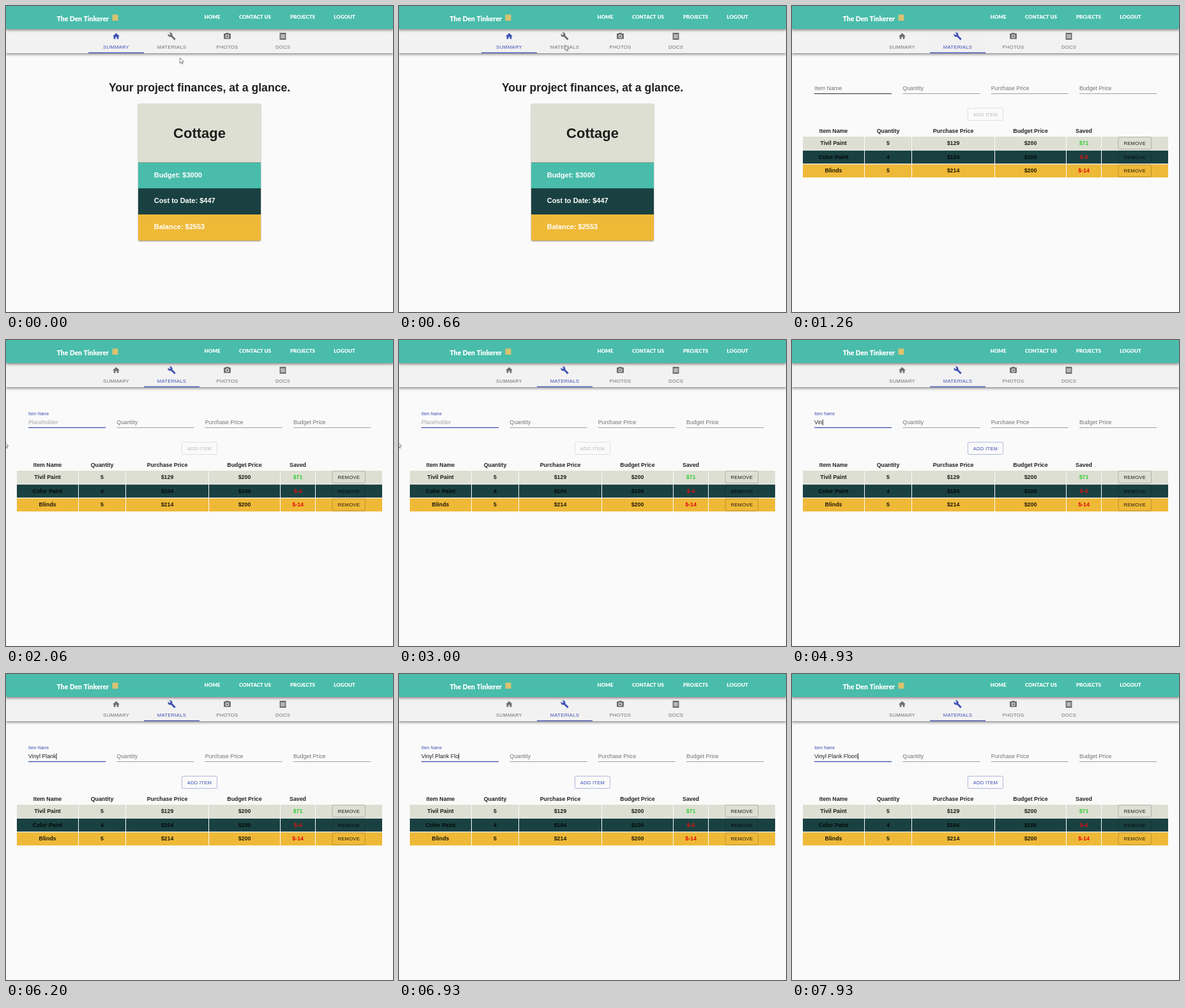
These frames come from a looping animation (606 px wide and 480 px high, 8000 ms). An HTML page with a canvas:

```html
<!DOCTYPE html>
<html lang="en">
<head>
<meta charset="utf-8">
<title>Project materials</title>
<style>
html, body { margin: 0; width: 100%; height: 100%; overflow: hidden; background: #fafafa; }
canvas { display: block; width: 100vw; height: 100vh; }
</style>
</head>
<body>
<canvas id="stage" width="606" height="480"></canvas>
<script>
const ctx = document.getElementById('stage').getContext('2d');
const LOOP = 8000;
const SANS = '"Liberation Sans", Arial, sans-serif';
const BRAND = 'Lato, sans-serif';
const INDIGO = '#3f51b5', INK = 'rgba(0,0,0,.87)', GREY = 'rgba(0,0,0,.54)';
const TEAL = '#49bcab', DARK = '#1a4141', GOLD = '#efb938', STONE = '#dcdfd2';

// Moments of the interaction, in ms
const PRESS = 650, SWITCH = 720, HOVER = 1150, FOCUS = 1400, LEAVE = 1540, FIRST_KEY = 3530;
const BLINK = 530;
const PHRASE = 'Vinyl Plank Floori';
const KEYS = [FIRST_KEY, 4600, 4800, 5060, 5200, 5340, 5480, 5630, 5780, 5930,
  6100, 6330, 6490, 6650, 6810, 6960, 7130, 7800];

const TABS = ['SUMMARY', 'MATERIALS', 'PHOTOS', 'DOCS'];
const ICONS = [
  'M10 20v-6h4v6h5v-8h3L12 3 2 12h3v8z',
  'M22.7 19l-9.1-9.1c.9-2.3.4-5-1.5-6.9-2-2-5-2.4-7.4-1.3L9 6 6 9 1.6 4.7C.4 7.1.9 10.1 2.9 12.1c1.9 1.9 4.6 2.4 6.9 1.5l9.1 9.1c.4.4 1 .4 1.4 0l2.3-2.3c.5-.4.5-1.1.1-1.4z',
  'M15.2 12a3.2 3.2 0 1 1-6.4 0 3.2 3.2 0 0 1 6.4 0zM9 2L7.2 4H4c-1.1 0-2 .9-2 2v12c0 1.1.9 2 2 2h16c1.1 0 2-.9 2-2V6c0-1.1-.9-2-2-2h-3.2L15 2H9zm3 15a5 5 0 1 1 0-10 5 5 0 0 1 0 10z',
  'M3 2h18v20H3zM6 7v2h12V7zM6 11v2h12v-2zM6 15v2h12v-2z'
].map(d => new Path2D(d));
const ARROW = new Path2D('M0 0V15L3.6 11.8 6 17.2 8.4 16.1 6 10.9H10.8z');
// Each move: start, end, then from and to positions
const MOVES = [
  [60, 520, 272.3, 81.3, 260, 61],
  [780, HOVER, 260, 61, 90, 130],
  [LEAVE - 80, 1730, 90, 130, -2.2, 160]
];

const FIELDS = ['Item Name', 'Quantity', 'Purchase Price', 'Budget Price'];
const HEADS = ['Item Name', 'Quantity', 'Purchase Price', 'Budget Price', 'Saved'];
const COLS = [17, 114, 188, 318, 430, 485, 590];
const ROWS = [
  { fill: STONE, saved: '#32cd32', cells: ['Tivil Paint', '5', '$129', '$200', '$71'] },
  { fill: DARK, saved: '#d81414', cells: ['Color Paint', '4', '$104', '$100', '$-4'] },
  { fill: GOLD, saved: '#e00808', cells: ['Blinds', '5', '$214', '$200', '$-14'] }
];

const clamp = x => Math.min(1, Math.max(0, x));
const ease = x => { x = clamp(x); return x * x * (3 - 2 * x); };
const lerp = (a, b, k) => a + (b - a) * k;
const mix = (a, b, k) => `rgba(${a.map((v, i) => lerp(v, b[i], k)).join()})`;

function text(s, x, y, size, color, { weight = 400, align = 'left', face = SANS, gap = 0 } = {}) {
  ctx.font = `${weight} ${size}px ${face}`;
  ctx.letterSpacing = gap + 'px';
  ctx.textAlign = align;
  ctx.fillStyle = color;
  ctx.fillText(s, x, y);
}

function rect(x, y, w, h, color) {
  ctx.fillStyle = color;
  ctx.fillRect(x, y, w, h);
}

function shaded(blur, dy, alpha, draw) {
  ctx.save();
  ctx.shadowColor = `rgba(0,0,0,${alpha})`;
  ctx.shadowBlur = blur;
  ctx.shadowOffsetY = dy;
  draw();
  ctx.restore();
}

function button(label, x, y, w, h, color, border) {
  ctx.strokeStyle = border;
  ctx.lineWidth = .8;
  ctx.beginPath();
  ctx.roundRect(x, y, w, h, 2);
  ctx.stroke();
  text(label, x + w / 2, y + h / 2 + 2.8, 7.7, color, { align: 'center', gap: .22 });
}

function drawRipple(t) {
  const grow = ease((t - PRESS) / 400), fade = 1 - clamp((t - SWITCH) / 550);
  if (!grow || !fade) return;
  ctx.save();
  ctx.beginPath();
  ctx.rect(216, 37, 87, 37);
  ctx.clip();
  ctx.fillStyle = `rgba(63,81,181,${.2 * fade})`;
  ctx.beginPath();
  ctx.arc(260, 62, 52 * grow, 0, 7);
  ctx.fill();
  ctx.restore();
}

function drawTabs(t) {
  shaded(4, 1.5, .45, () => rect(0, 36, 606, 38, '#f2f2f2'));
  drawRipple(t);
  const active = t < SWITCH ? 0 : 1;
  TABS.forEach((label, i) => {
    const x = 172.5 + 87 * i, color = i === active ? INDIGO : GREY;
    ctx.save();
    ctx.translate(x - 6.6, 40.8);
    ctx.scale(.55, .55);
    ctx.fillStyle = color;
    ctx.fill(ICONS[i], 'evenodd');
    ctx.restore();
    text(label, x, 66.5, 7.7, color, { align: 'center', gap: .25 });
  });
  rect(129 + 87 * ease((t - SWITCH) / 300), 72.7, 87, 1.3, INDIGO);
}

function drawHeader() {
  shaded(4, 1.5, .45, () => rect(0, 0, 606, 36, TEAL));
  text('The Den Tinkerer', 79.5, 23.6, 10.4, '#fff', { weight: 900, face: BRAND });
  rect(166.5, 13.5, 9, 9.5, '#d9c270');
  [['HOME', 323], ['CONTACT US', 390], ['PROJECTS', 464.5], ['LOGOUT', 530]].forEach(([s, x]) =>
    text(s, x, 20.4, 8, '#fff', { weight: 900, align: 'center', face: BRAND }));
}

function drawSummary() {
  text('Your project finances, at a glance.', 303, 134, 17.6, INK, { weight: 700, align: 'center' });
  const card = () => { ctx.beginPath(); ctx.roundRect(207, 153, 192, 215, 2.5); };
  shaded(2, 1, .45, () => { card(); ctx.fillStyle = GOLD; ctx.fill(); });
  ctx.save();
  card();
  ctx.clip();
  rect(207, 153, 192, 92, STONE);
  rect(207, 245, 192, 1, '#8a9f95');
  rect(207, 246, 192, 40, TEAL);
  rect(207, 286, 192, 41, DARK);
  ctx.restore();
  text('Cottage', 303, 207, 22, INK, { weight: 700, align: 'center' });
  ['Budget: $3000', 'Cost to Date: $447', 'Balance: $2553'].forEach((s, i) =>
    text(s, 231.7, 268.6 + 40.6 * i, 11, '#fff', { weight: 700 }));
}

function drawCaret(x, since) {
  if (Math.floor(since / BLINK) % 2 === 0) rect(x, 124.5, .9, 9.5, '#222');
}

function drawFields(t) {
  const count = KEYS.filter(k => k <= t).length;
  const k = ease((t - FOCUS) / 200);
  FIELDS.forEach((label, i) => {
    const x = 35 + 138.35 * i;
    rect(x, 137, 121, 1, 'rgba(0,0,0,.36)');
    if (i) text(label, x, 132.3, 8.8, GREY);
  });
  if (t < FOCUS + 200) rect(35, 137, 121, 1.1, `rgba(0,0,0,${.65 * clamp((t - HOVER) / 100)})`);
  text(FIELDS[0], 35, lerp(132.3, 118.1, k), lerp(8.8, 6.6, k), mix([0, 0, 0, .54], [63, 81, 181, 1], k));
  if (!k) return;

  rect(95.5 - 60.5 * k, 136.8, 121 * k, 1.3, INDIGO);
  const typed = PHRASE.slice(0, count);
  if (!count) text('Placeholder', 35, 132.3, 8.8, `rgba(0,0,0,${.34 * k})`);
  text(typed, 35, 132.3, 8.8, INK);
  drawCaret(35.2 + ctx.measureText(typed).width, t - (count ? KEYS[count - 1] : FOCUS));
}

function drawTable() {
  const mid = i => (COLS[i] + COLS[i + 1] - 1) / 2;
  const bold = { weight: 700, align: 'center' };
  HEADS.forEach((s, i) => text(s, mid(i), 199.2, 8.8, INK, bold));
  ROWS.forEach((row, r) => {
    const y = 205 + 21.7 * r;
    for (let c = 0; c < 6; c++) rect(COLS[c], y, COLS[c + 1] - COLS[c] - 1, 20.5, row.fill);
    row.cells.forEach((s, c) => text(s, mid(c), y + 13, 8.8, c === 4 ? row.saved : INK, bold));
    button('REMOVE', 511, y + .6, 51.5, 18.9, INK, 'rgba(0,0,0,.25)');
  });
}

function drawMaterials(t) {
  drawFields(t);
  const k = ease((t - FIRST_KEY) / 250);
  button('ADD ITEM', 275.4, 160.3, 55.2, 19.2,
    mix([0, 0, 0, .26], [63, 81, 181, 1], k), mix([0, 0, 0, .14], [63, 81, 181, .5], k));
  drawTable();
}

function drawPointer(t) {
  // Hidden over the text field and while typing
  if (t >= HOVER && t < LEAVE || t >= FIRST_KEY) return;
  const [start, end, x0, y0, x1, y1] = MOVES.findLast(m => m[0] <= t) || MOVES[0];
  const k = ease((t - start) / (end - start));
  ctx.save();
  ctx.translate(lerp(x0, x1, k), lerp(y0, y1, k));
  ctx.scale(.57, .57);
  ctx.fillStyle = '#fff';
  ctx.strokeStyle = '#555';
  ctx.lineWidth = 1.3;
  ctx.fill(ARROW);
  ctx.stroke(ARROW);
  ctx.restore();
}

function frame(now) {
  const t = now % LOOP;
  rect(0, 0, 606, 480, '#fafafa');
  if (t < SWITCH) drawSummary();
  else drawMaterials(t);
  drawTabs(t);
  drawHeader();
  drawPointer(t);
  requestAnimationFrame(frame);
}
requestAnimationFrame(frame);
</script>
</body>
</html>
```
